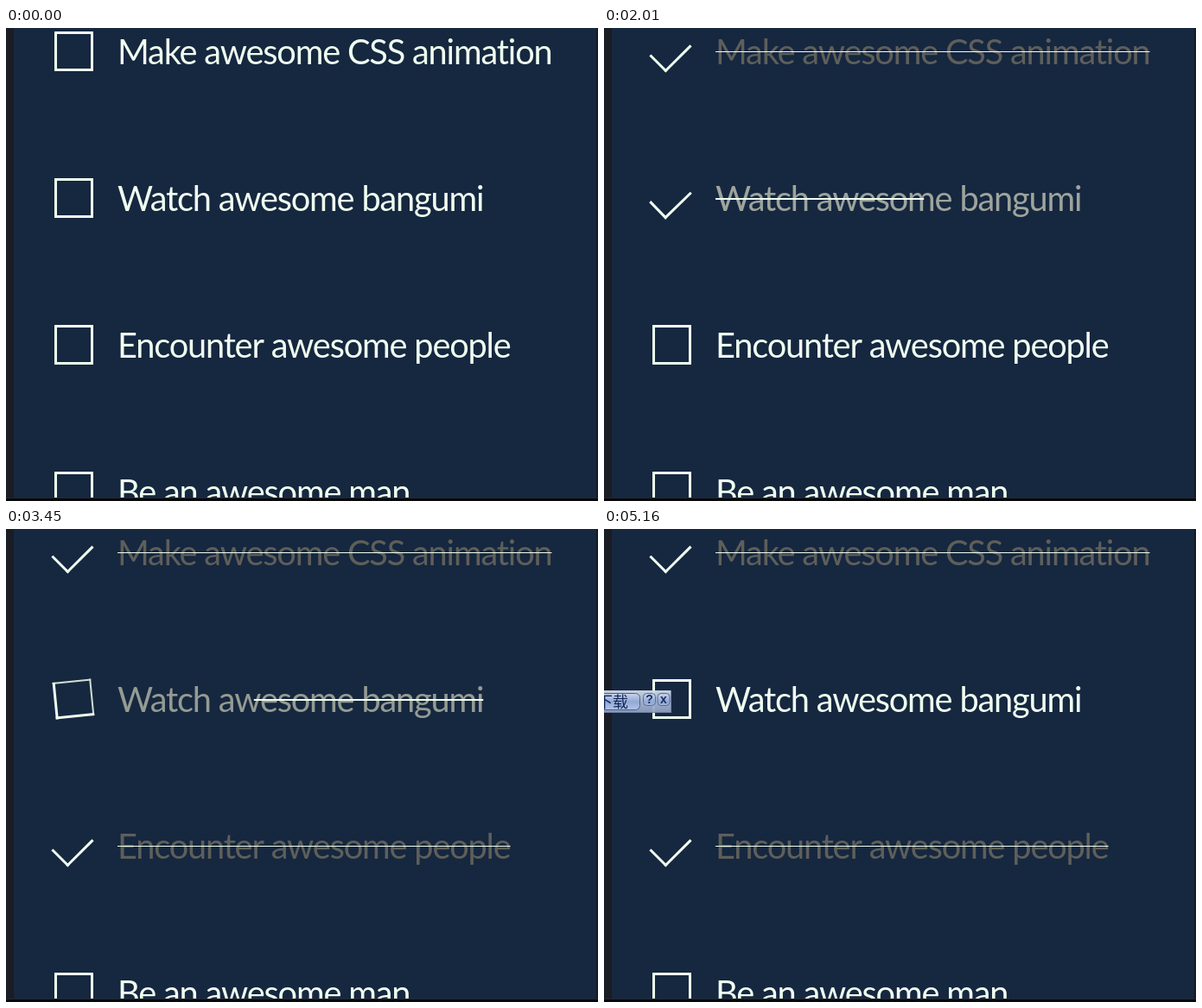
These frames come from a looping animation (685 px wide and 548 px high, 5850 ms). An HTML page with a canvas:

```html
<!DOCTYPE html>
<html lang="en">
<head>
<meta charset="utf-8">
<title>Todo list</title>
<style>
  html, body { margin: 0; width: 100%; height: 100%; overflow: hidden; background: #162740; }
  canvas { display: block; }
</style>
</head>
<body>
<canvas id="stage" width="685" height="548"></canvas>
<script>
const ctx = document.getElementById('stage').getContext('2d', { alpha: false });

const LOOP = 5850, STEP = 30;
const BOX_MS = 200, LABEL_MS = 500;
const POPUP_AT = 4470;
const LIGHT = [240, 255, 240], DIM = [94, 95, 90], BLACK = [0, 0, 0];
const LIGHT_CSS = `rgb(${LIGHT})`;
const EM = 39.75, TRACKING = -0.03 * EM;
const BOX_LEFT = 55.6, CHECKED_HEIGHT = 0.6 * EM, BORDER = 3;
const LABEL_LEFT = 129, BASELINE = 15;

// Each item toggles at the listed times, starting unchecked.
const items = [
  { label: 'Make awesome CSS animation', toggles: [945] },
  { label: 'Watch awesome bangumi', toggles: [1845, 3333] },
  { label: 'Encounter awesome people', toggles: [2685] },
  { label: 'Be an awesome man', toggles: [4215, 4683] },
];

const mix = (a, b, p) => a + (b - a) * p;
const mixColor = (a, b, p) => `rgb(${a.map((v, i) => Math.round(mix(v, b[i], p)))})`;

// CSS "ease": cubic-bezier(.25, .1, .25, 1)
function ease(x) {
  if (x <= 0) return 0;
  if (x >= 1) return 1;
  const bezier = (a, b, s) => 3 * a * s * (1 - s) ** 2 + 3 * b * s * s * (1 - s) + s ** 3;
  let lo = 0, hi = 1;
  for (let i = 0; i < 24; i++) {
    const mid = (lo + hi) / 2;
    if (bezier(0.25, 0.25, mid) < x) lo = mid; else hi = mid;
  }
  return bezier(0.1, 1, lo);
}

function rect(color, x, y, w, h) {
  ctx.fillStyle = color;
  ctx.fillRect(x, y, w, h);
}

function roundRect(x, y, w, h, r, fill, stroke) {
  ctx.beginPath();
  ctx.roundRect(x, y, w, h, r);
  ctx.fillStyle = fill;
  ctx.fill();
  ctx.strokeStyle = stroke;
  ctx.lineWidth = 1;
  ctx.stroke();
}

function verticalGradient(y0, y1, ...colors) {
  const g = ctx.createLinearGradient(0, y0, 0, y1);
  colors.forEach((c, i) => g.addColorStop(i / (colors.length - 1), c));
  return g;
}

function drawBox(cy, checked, p) {
  const on = checked ? p : 1 - p;
  if (on === 0) {
    ctx.strokeStyle = LIGHT_CSS;
    ctx.lineWidth = BORDER;
    ctx.strokeRect(57.5, cy - 21.5, 42, 43);
    return;
  }
  // Top and right borders vanish at once when checked, and grow back when unchecked.
  const thin = checked || p === 0 ? 0 : Math.max(1, Math.floor(BORDER * p));
  const w = EM + BORDER + thin;
  const h = mix(EM, CHECKED_HEIGHT, on) + BORDER + thin;
  ctx.save();
  ctx.translate(BOX_LEFT + w / 2, cy);
  ctx.rotate(-Math.PI / 4 * on);
  if (thin) {
    const fading = mixColor(BLACK, LIGHT, p);
    rect(fading, -w / 2, -h / 2, w, thin);
    rect(fading, w / 2 - thin, -h / 2, thin, h);
  }
  rect(LIGHT_CSS, -w / 2, -h / 2, BORDER, h);
  rect(LIGHT_CSS, -w / 2, h / 2 - BORDER, w, BORDER);
  ctx.restore();
}

function drawLabel(text, cy, checked, p) {
  const on = checked ? p : 1 - p;
  ctx.font = `${EM}px Lato, sans-serif`;
  ctx.letterSpacing = `${TRACKING}px`;
  ctx.textAlign = 'left';
  ctx.fillStyle = mixColor(LIGHT, DIM, on);
  ctx.fillText(text, LABEL_LEFT, cy + BASELINE);
  const full = ctx.measureText(text).width;
  ctx.letterSpacing = '0px';
  if (on < 0.002) return;
  const left = checked ? LABEL_LEFT : LABEL_LEFT + full * p;
  rect(LIGHT_CSS, left, cy, full * on, on > 0.995 ? 1 : 2);
}

function drawItem(item, index, t) {
  const past = item.toggles.filter(at => at <= t);
  const checked = past.length % 2 === 1;
  const age = past.length ? t - past[past.length - 1] : Infinity;
  const cy = 27 + 170 * index;
  drawBox(cy, checked, ease(age / BOX_MS));
  drawLabel(item.label, cy, checked, ease(age / LABEL_MS));
}

function drawPopup() {
  ctx.save();
  ctx.globalAlpha = 0.94;
  rect(verticalGradient(187, 213, '#d3dbe9', '#aab8d2', '#8d9dbd'), 0, 187, 77, 26);
  ctx.restore();
  rect('#6f7f9f', 0, 212, 77, 1);
  rect('#7485a6', 77, 187, 1, 26);
  const face = verticalGradient(190, 210, '#cbd7ee', '#93a9d4', '#b3c5e8');
  roundRect(-20, 190.5, 61.5, 19, 5, face, '#4d6191');
  ctx.fillStyle = '#14285a';
  ctx.font = '18px "Noto Sans CJK SC", "Noto Sans CJK", sans-serif';
  ctx.textAlign = 'left';
  ctx.fillText('下载', -8, 206.5);
  ctx.font = 'bold 14px "Liberation Sans", sans-serif';
  ctx.textAlign = 'center';
  [['?', 52.5], ['x', 69]].forEach(([sign, x]) => {
    roundRect(x - 7, 190.5, 14, 14, 4, face, '#5a6d99');
    ctx.fillStyle = '#1c2f5e';
    ctx.fillText(sign, x, 202);
  });
}

function draw(t) {
  rect('#162740', 0, 0, 685, 548);
  rect('#1a1d23', 0, 0, 9, 548);
  rect('#141a24', 683, 0, 2, 548);
  items.forEach((item, i) => drawItem(item, i, t));
  if (t >= POPUP_AT) drawPopup();
  rect('#25282d', 0, 544, 685, 1);
  rect('#08090b', 0, 545, 685, 3);
}

const start = performance.now();
function tick() {
  const t = (performance.now() - start) % LOOP;
  draw(Math.floor(t / STEP) * STEP);
  requestAnimationFrame(tick);
}
tick();
</script>
</body>
</html>
```
